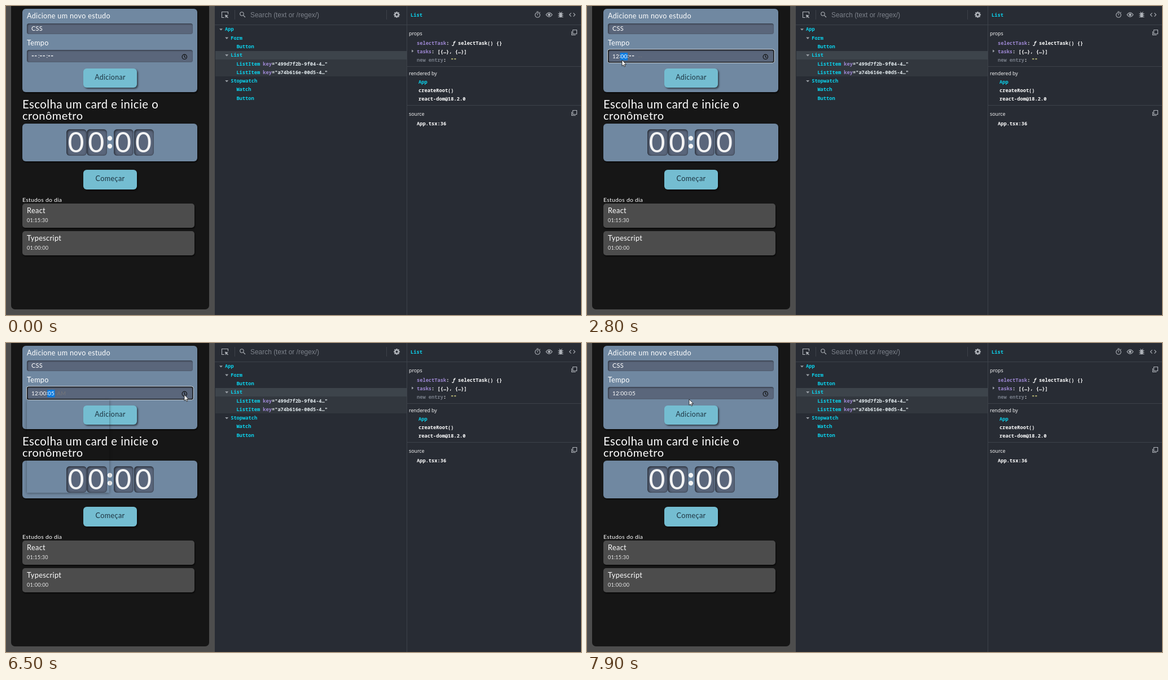
Recreate the animation shown at these times as an HTML page. Size 1019 by 549 pixels, loop 8000 ms.

```html
<!DOCTYPE html>
<html lang="pt">
<head>
<meta charset="utf-8">
<style>
html, body { margin: 0; width: 100%; height: 100%; overflow: hidden; background: #282c34; }
#stage { position: absolute; left: 0; top: 0; width: 1019px; height: 549px; overflow: hidden; }
#stage div, svg { position: absolute; box-sizing: border-box; }
svg { left: 0; top: 0; }
text { white-space: pre; }
.app { font-family: Lato, sans-serif; letter-spacing: .025em; }
.mono { font-family: "Noto Sans Mono", monospace; font-size: 8.7px; font-weight: 600; }
.ui { font-family: "Open Sans", sans-serif; font-size: 8.8px; }
.arial { font-family: "Liberation Sans", Arial, sans-serif; }
.panel { background: #7088a1; border-radius: 6px; box-shadow: 1px 2px 2px #0009; }
.field { background: #5a667b; border-radius: 4px; box-shadow: inset 1px 1px 3px #0008; }
.digit { background: #5a667b; border-radius: 6px; box-shadow: inset 1px 1px 4px #000b; }
.button { background: #74bdd1; border-radius: 6px; box-shadow: 2px 2px 3px #0008; }
.card { background: #4c4c4c; border-radius: 5px; box-shadow: 1px 2px 2px #0009; }
.line { background: #3d424a; }
.icon { fill: none; stroke: #afb3b9; stroke-width: 1.1; }
</style>
</head>
<body>
<div id="stage"></div>
<script>
const CYAN = '#0bd3ee', PURPLE = '#9d87d2', WHITE = '#fff', INK = '#1d3340';
const stage = document.getElementById('stage');

const box = (cls, x, y, w, h, style = '', id = '') =>
  `<div id="${id}" class="${cls}" style="left:${x}px;top:${y}px;width:${w}px;height:${h}px;${style}"></div>`;
const text = (cls, x, y, s, fill = WHITE, size = '', attrs = '') =>
  `<text class="${cls}" x="${x}" y="${y}" fill="${fill}" ${size && `style="font-size:${size}px"`} ${attrs}>${s}</text>`;
const rect = (x, y, w, h, fill, attrs = '') =>
  `<rect x="${x}" y="${y}" width="${w}" height="${h}" fill="${fill}" ${attrs}/>`;
const span = (fill, s) => `<tspan fill="${fill}">${s}</tspan>`;
const icon = (x, y, body) => `<g class="icon" transform="translate(${x} ${y})">${body}</g>`;
const middle = 'text-anchor="middle"';

const boxes = [
  box('', 0, 0, 370, 549, 'background:#4d4d4d'),
  box('', 9, -10, 350.5, 549, 'background:#161616;border-radius:7px'),
  box('panel', 29, 5, 310, 147.5),
  box('field', 37, 31, 294, 18.5),
  box('field', 37, 78, 294, 22),
  box('button', 137, 110.5, 95, 34.5),
  box('panel', 29, 209, 310, 66.5),
  ...[107, 143, 190.5, 226.5].map(x => box('digit', x, 219, 35.5, 46.5)),
  box('button', 137, 291, 95, 34.5),
  box('card', 29, 351, 305, 43),
  box('card', 29, 400, 305, 43),
  box('', 371, 80, 339, 15.2, 'background:#3d444b'),
  box('', 371, 95.2, 339, 30.3, 'background:#32373e'),
  box('line', 370, 33, 649, 1),
  box('line', 710, 0, 1, 549),
  box('line', 404.5, 7, 1, 17),
  box('line', 674, 7, 1, 17),
  box('line', 711, 107, 308, 1),
  box('line', 711, 176, 308, 1),
].join('');

const app = [
  text('app', 37, 22, 'Adicione um novo estudo', WHITE, 12.6),
  text('app', 45, 44, 'CSS', WHITE, 11),
  text('app', 37, 69.5, 'Tempo', WHITE, 12.6),
  text('app', 184.5, 130.5, 'Adicionar', INK, 12.4, middle),
  text('app', 29, 182, 'Escolha um card e inicie o', WHITE, 20.3),
  text('app', 29, 202, 'cronômetro', WHITE, 20),
  ...[124.7, 160.5, 208.2, 244.2].map(x => text('app', x, 260, '0', '#f4f4f4', 50, middle)),
  ...[235, 249].map(y => `<circle cx="184" cy="${y}" r="4.2" fill="#f4f4f4"/>`),
  text('app', 184.5, 311, 'Começar', INK, 12.7, middle),
  text('app', 29, 348, 'Estudos do dia', WHITE, 10.4),
  text('app', 37, 368, 'React', WHITE, 12.8),
  text('app', 37, 383.5, '01:15:30', '#e8e8e8', 9),
  text('app', 37, 416.5, 'Typescript', WHITE, 12.8),
  text('app', 37, 432.5, '01:00:00', '#e8e8e8', 9.2),
].join('');

// Component tree: indent level, label, has children
const item = key => `ListItem ${span(PURPLE, 'key')}${span('#e2eaee', `="${key}…"`)}`;
const tree = [
  [0, 'App', 1], [1, 'Form', 1], [2, 'Button'], [1, 'List', 1],
  [2, item('499d7f2b-9f04-4')], [2, item('a74b616e-00d5-4')],
  [1, 'Stopwatch', 1], [2, 'Watch'], [2, 'Button'],
].map(([level, label, open], i) => {
  const x = 388 + level * 10.2, y = 44.4 + i * 15.28;
  return text('mono', x, y, label, CYAN) +
    (open ? `<path d="M${x - 10} ${y - 4.2}h6l-3 3.4z" fill="#9a9fa6"/>` : '');
}).join('');

const copy = '<path d="M-2.5-4.5h7v7h-7zM-4.5-2v6.5h7"/>';
const gear = Array.from({ length: 8 }, (_, i) => `<path d="M0-3.5V-5.5" stroke-width="2.2" transform="rotate(${i * 45})"/>`).join('');
const devtools = [
  icon(388, 15.5, '<path d="M-1 5h-4.5V-5H5.5V-1"/><path d="M0 0l1.3 6 1.4-2.2L5 6 6 5 3.7 2.7 6 1.3z" fill="#afb3b9" stroke="none"/>'),
  icon(419, 15, '<circle cx="-1" cy="-1" r="3.2"/><path d="M1.3 1.3L5 5"/>'),
  icon(692.5, 15.5, gear + '<circle r="3.1" stroke-width="2.4"/>'),
  icon(942, 16, '<circle r="4.3"/><path d="M-1.7-6h3.4M0-2.6V.6M3.5-4l1-1"/>'),
  icon(962.5, 15.5, '<path d="M-5.5 0Q0-7.5 5.5 0Q0 7.5-5.5 0z"/><circle r="1.7" fill="#afb3b9"/>'),
  icon(983, 15.5, '<rect x="-2" y="-3.2" width="4" height="7.5" rx="2" fill="#afb3b9"/><path d="M-4.5-2h9M-4.5 1h9M-4.5 4h9M-2.5-5l1.3 1.5M2.5-5L1.2-3.5"/>'),
  icon(1003.5, 15.5, '<path d="M-2-3.2L-5 0l3 3.2M2-3.2L5 0 2 3.2"/>'),
  icon(1007, 47, copy), icon(1007, 190, copy),
  text('arial', 433, 20, 'Search (text or /regex/)', '#7d828b', 11.95),
  text('mono', 717, 18.5, 'List', CYAN),
  text('ui', 714, 51.5, 'props'),
  text('mono', 728, 68.5, span(PURPLE, 'selectTask') + ': <tspan font-style="italic">ƒ</tspan> selectTask() {}'),
  '<path d="M719 77.5v5l3.4-2.5z" fill="#9a9fa6"/>',
  text('mono', 728, 83.7, span(PURPLE, 'tasks') + ': [{…}, {…}]'),
  text('mono', 728, 99, span('#777d88', 'new entry') + ':'),
  text('mono', 788, 99, '""', '#e3e08a'),
  text('ui', 714, 123, 'rendered by'),
  text('mono', 731, 137.5, 'App', CYAN),
  text('mono', 731, 152.8, 'createRoot()'),
  text('mono', 731, 168, 'react-dom@18.2.0'),
  text('ui', 714, 194.5, 'source'),
  text('mono', 728, 211.5, 'App.tsx:36'),
].join('');

const two = n => String(n).padStart(2, '0');
const columns = [['12', 1], ['00', 1], ['05', 6], ['AM']];
const picker = rect(37, 101, 145.5, 165, '#fff') + columns.map(([head, first], i) => {
  const x = 56 + i * 35.8;
  const cells = first ? Array.from({ length: 6 }, (_, k) => two(first + k)) : ['PM'];
  return rect(x - 17, 102.5, 33.5, 23.5, '#0075ff', i == 2 ? 'stroke="#101010" stroke-width="1.6"' : '') +
    text('arial', x, 117.4, head, '#fff', 9, middle + ' font-weight="bold"') +
    cells.map((s, k) => text('arial', x, 140.4 + k * 23, s, '#222', 9, middle)).join('');
}).join('');

stage.innerHTML = boxes + `<svg width="1019" height="549">${app}${tree}${devtools}
  <g id="time"></g>
  <g fill="none" stroke="#111" stroke-width="1.2"><circle cx="316.3" cy="90.3" r="4.2"/><path d="M316.3 87.5v3l2 1.2"/></g>
  <g id="ring" fill="none">${rect(36.5, 77, 295.5, 24, 'none', 'rx="3.5" stroke="#fff" stroke-width=".8"')}
  ${rect(37.6, 78.1, 293.3, 21.8, 'none', 'rx="2.5" stroke="#101010" stroke-width="1.4"')}</g></svg>` +
  box('', 37, 101, 145.5, 165, 'box-shadow:0 1px 5px #0006', 'shadow') +
  `<svg width="1019" height="549"><g id="picker">${picker}</g>
  <path id="cursor" d="M0 0V10.6L2.5 8.4 4.1 12 5.8 11.3 4.2 7.8H7.6Z" fill="#fff" stroke="#111" stroke-width=".8"/></svg>`;

const [timeText, ring, shadow, pickerBox, cursor] =
  ['time', 'ring', 'shadow', 'picker', 'cursor'].map(id => document.getElementById(id));
const show = (el, on) => el.style.display = on ? '' : 'none';

// Pointer stops: time, x, y
const path = [
  [100, 16, -14], [200, 18, -4], [600, 68, 48], [900, 57, 84], [1000, 57, 84], [1100, 54, 89], [1200, 54, 89],
  [1300, 62, 96], [4300, 62, 96], [4500, 100, 97], [4600, 100, 97], [5000, 128, 130],
  [5100, 128, 130], [5200, 107, 130], [5900, 306, 89], [6000, 306, 89], [6100, 309, 91],
  [6200, 309, 91], [6300, 316, 92], [6800, 316, 92], [7300, 304, 121], [7400, 304, 121],
  [7700, 233, 100], [7800, 233, 100], [7900, 181, 100], [8000, 181, 100],
];
function pointer(t) {
  const i = path.findIndex(p => p[0] > t);
  if (i < 1) return [-20, -20];
  const [t0, x0, y0] = path[i - 1], [t1, x1, y1] = path[i], k = (t - t0) / (t1 - t0);
  return [x0 + (x1 - x0) * k, y0 + (y1 - y0) * k];
}

const slot = i => 45 + i * 14.5;
function drawTime(t, focused) {
  const seconds = Math.min(5, Math.floor((t - 3800) / 100));
  const parts = [t >= 2100 ? '12' : '--', t >= 2800 ? '00' : '--', t >= 3800 ? two(seconds) : '--'];
  const active = t < 2300 ? 0 : t < 3400 ? 1 : 2;
  timeText.innerHTML = (focused ? rect(slot(active) - .8, 83, 13.3, 13.5, '#0a7be0') : '') +
    parts.map((s, i) => s == '--'
      ? text('app', slot(i), 93, s, WHITE, 13, 'font-weight="bold"')
      : text('app', slot(i), 92.5, s, WHITE, 10)).join('') +
    [0, 1].map(i => text('app', slot(i) + 12.1, 92.3, ':', WHITE, 10)).join('') +
    (focused ? text('app', 90.5, 92.5, t < 3800 ? '--' : 'AM', '#74757a', 9.5) : '');
}

function frame(now) {
  const t = Math.floor(now % 8000 / 100) * 100;
  const focused = t >= 1200 && t < 7500;
  drawTime(t, focused);
  show(ring, focused);
  show(shadow, t >= 6500 && t < 7500);
  show(pickerBox, t >= 6600 && t < 7500);
  cursor.setAttribute('transform', `translate(${pointer(t)})`);
  requestAnimationFrame(frame);
}
requestAnimationFrame(frame);
</script>
</body>
</html>
```
